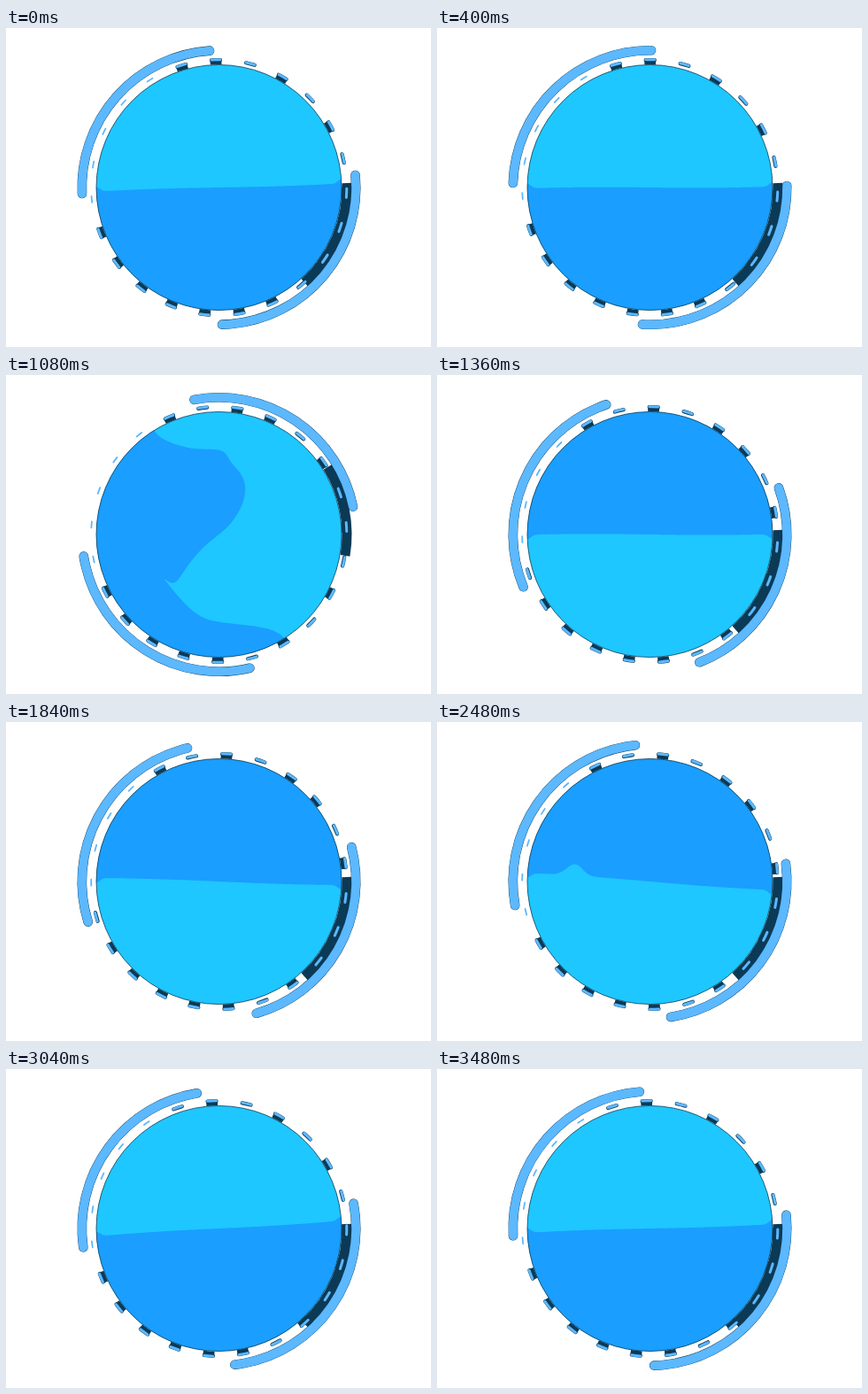
Recreate the animation shown at these times as an HTML page with a canvas. Size 480 px wide and 360 px high, loop 3.52 s.

```html
<!DOCTYPE html>
<html lang="en">
<head>
<meta charset="utf-8">
<title>Flipping liquid loader</title>
<style>
  html, body { margin: 0; width: 100%; height: 100%; overflow: hidden; background: #fff; }
  canvas { display: block; }
</style>
</head>
<body>
<canvas id="stage" width="480" height="360"></canvas>
<script>
const ctx = document.getElementById('stage').getContext('2d');
const LOOP = 3520, FLIP = 480, R = 138.5, DASHES = 23;
const LIGHT = '#1ec7ff', DEEP = '#1a9eff', RING = '#5cb8ff', NAVY = '#0b3a57';
const STEP = 360 / DASHES;

const rad = deg => deg * Math.PI / 180;
const clamp = v => Math.min(1, Math.max(0, v));
const gauss = (d, width) => Math.exp(-((d / width) ** 2));

function ease(t) {
  t = clamp(t);
  return t < 0.5 ? 4 * t ** 3 : 1 - 4 * (1 - t) ** 3;
}

// Slow drift plus two quick flips; the turns add up to `total`.
function turn(t, speed, first, total, start1, start2) {
  const second = total - first - speed * LOOP / 1000;
  return speed * t / 1000 + first * ease((t - start1) / FLIP)
    + second * ease((t - start2) / FLIP);
}

// How far the surface is stirred, `d` ms from the middle of a flip.
function churn(d) {
  const k = d / (d < 0 ? 270 : 240);
  return Math.abs(k) < 1 ? Math.cos(k * Math.PI / 2) ** 2 : 0;
}

// The small bump that announces a flip.
function swell(d) {
  return 14 * clamp((d + 430) / 155) ** 1.6 * clamp(-d / 200);
}

// Surface point for u in -1..1: a flat line blended into a breaking wave.
function surface(u, mix, bump) {
  const v = Math.abs(u);
  const lobe = Math.sin(Math.PI * v ** 0.63) * (1 - v ** 4);
  const wave = u > 0 ? 83 * lobe : -60 * lobe - 11 * gauss(u + 0.57, 0.1);
  const rest = bump * gauss(u - 0.62, 0.09) + 0.8 * Math.sin(3 * u);
  const x = R * u - 36 * mix * gauss(u - 0.33, 0.11);
  const rim = -5 * (1 - mix) * gauss(v - 1, 0.04);
  return [x, rest + (wave - rest) * mix + rim];
}

function arc(r, from, to, width, color, cap = 'butt') {
  ctx.beginPath();
  ctx.arc(0, 0, r, rad(from), rad(to));
  ctx.lineWidth = width;
  ctx.lineCap = cap;
  ctx.strokeStyle = color;
  ctx.stroke();
}

function drawShadow(mix) {
  arc(144.5, -2 - 31 * mix, 48 - 40 * mix, 11, NAVY);
}

function drawDashes(angle) {
  for (let i = 0; i < DASHES; i++) {
    const a = (angle + i * STEP + 720) % 360;
    const faint = a > 165 && a < 240;
    const backed = a > 75 && a < 160 || !faint && i % 2 === 0;
    const half = faint ? 1.4 : 2;
    if (backed) arc(141.5, a - 2.6, a + 2.6, 5.5, NAVY);
    if (!faint) arc(144, a - half, a + half, 4.2, NAVY, 'round');
    arc(144.3, a - half, a + half, faint ? 1.8 : 3, RING, 'round');
  }
}

function drawRing(angle) {
  for (const [from, to] of [[177.4, 266.1], [-5.2, 88.7]]) {
    arc(154.7, angle + from, angle + to, 10.6, NAVY, 'round');
    arc(154.7, angle + from, angle + to, 9.9, RING, 'round');
  }
}

function drawLiquid(angle, mix, bump) {
  ctx.save();
  ctx.beginPath();
  ctx.arc(0, 0, R, 0, 2 * Math.PI);
  ctx.fillStyle = LIGHT;
  ctx.fill();
  ctx.clip();
  ctx.rotate(rad(angle));
  ctx.beginPath();
  for (let u = 1; u > -1.01; u -= 0.01) ctx.lineTo(...surface(u, mix, bump));
  ctx.lineTo(-150, 150);
  ctx.lineTo(150, 150);
  ctx.fillStyle = DEEP;
  ctx.fill();
  ctx.restore();
  arc(R, 0, 360, 0.8, NAVY);
}

function draw(t) {
  const ring = turn(t, 11.1, 147.6, 360, 845, 2475);
  const dash = turn(t, 3.7, 45, 7 * STEP, 845, 2460) - 91.4;
  const liquid = turn(t, 3.7, 176.7, 360, 875, 2524) - 1.9;
  const d1 = t - 1115, d2 = t - 2764;
  const mix = churn(d1) + churn(d2);

  ctx.setTransform(1, 0, 0, 1, 0, 0);
  ctx.fillStyle = '#fff';
  ctx.fillRect(0, 0, 480, 360);
  ctx.translate(240.5, 180);
  drawShadow(mix);
  drawDashes(dash);
  drawRing(ring);
  drawLiquid(liquid, mix, swell(d1) + swell(d2));
}

const begin = performance.now();
function tick() {
  draw((performance.now() - begin) % LOOP);
  requestAnimationFrame(tick);
}
tick();
</script>
</body>
</html>
```
